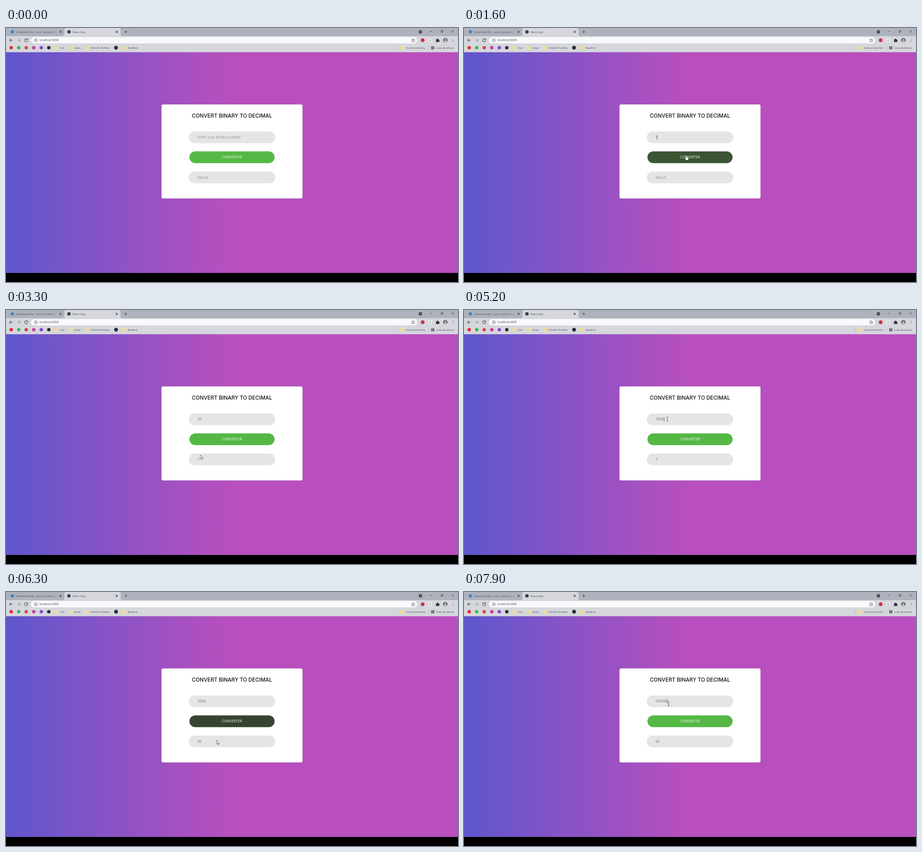
These frames come from a looping animation (998x561 px, 8 s). An HTML page:

```html
<!DOCTYPE html>
<html lang="en">
<head>
<meta charset="utf-8">
<title>Binary converter</title>
<style>
  html, body { margin: 0; width: 100%; height: 100%; overflow: hidden; background: #000; }
  svg { display: block; width: 100%; height: 100%; }
  .ui { font: 6px "Open Sans", sans-serif; fill: #4b4d54; }
  .page { font: 300 8.1px Inter, sans-serif; fill: #858585; }
  .line { fill: none; stroke: #44464d; stroke-width: 1.1; }
</style>
</head>
<body>
<svg viewBox="0 0 998 561">
  <defs>
    <linearGradient id="sky">
      <stop offset="0" stop-color="#5f56cc"/>
      <stop offset=".5" stop-color="#b94fbe"/>
    </linearGradient>
    <linearGradient id="fadeTab" x1="0" x2="1">
      <stop offset="0" stop-color="#afb2bc" stop-opacity="0"/>
      <stop offset="1" stop-color="#afb2bc"/>
    </linearGradient>
  </defs>

  <!-- Browser frame -->
  <rect width="998" height="54" fill="#d5d7dd"/>
  <rect width="998" height="18" fill="#afb2bc"/>
  <path d="M125 18q4 0 4-4V4q0-4 4-4h116q4 0 4 4v10q0 4 4 4z" fill="#d5d7dd"/>
  <rect x="55" y="20" width="853" height="14" rx="7" fill="#f8f9fa"/>
  <g class="ui">
    <text x="22" y="11">Download file – your conversion</text>
    <rect x="98" y="2" width="16" height="14" fill="url(#fadeTab)"/>
    <rect x="114" y="2" width="12" height="14" fill="#afb2bc"/>
    <text x="147" y="11">React App</text>
    <text x="74" y="29.3" font-size="6.3">localhost:3000</text>
  </g>
  <g id="marks"></g>
  <g class="line">
    <path d="M118.500 6.500l4 4m0-4l-4 4M242.500 6.500l4 4m0-4l-4 4M261.500 8.500h6m-3-3v6"/>
    <path d="M15 27H8m3-3l-3 3 3 3"/>
    <path d="M24.500 27h7m-3-3l3 3-3 3" stroke="#92959d"/>
    <path d="M47 25a3.300 3.300 0 1 0 .7 3M48 23.500v2.500h-2.500"/>
    <circle cx="66" cy="27" r="3.200" stroke-width=".8"/>
    <path d="M66 26.500v2.200m0-3.700v.8" stroke-width=".8"/>
    <path d="M899 23.400l1.100 2.500 2.700.2-2 1.800.6 2.700-2.400-1.400-2.400 1.400.6-2.700-2-1.800 2.700-.2z" stroke-width=".8"/>
    <path d="M935 7.500h6M983.500 5l5 5m0-5l-5 5" stroke-width=".8"/>
    <path d="M960 6.500h3.500v3.500H960zm1.300 0V5.200h3.500v3.500h-1.300" stroke-width=".7"/>
    <path d="M864.500 39v9M933.500 39v9" stroke="#b3b6bd" stroke-width=".8"/>
    <path d="M939.500 41h5.500v5.500h-5.500zm0 1.900h5.500m-5.500 1.800h5.500"/>
  </g>
  <circle cx="915" cy="8.500" r="3.700" fill="#3b3d43"/>
  <path d="M913.300 7.700h3.400l-1.700 2z" fill="#d5d7dd"/>
  <rect x="932.500" y="23" width="8" height="8" rx="1" fill="#eceef1"/>
  <path d="M936.500 24.500v4m-1.500-1.500l1.500 1.500 1.500-1.500" class="line" style="stroke-width:.7"/>
  <path d="M949.500 25h2q0-1.800 1.300-1.800t1.300 1.800h2v2q1.500 0 1.500 1.200t-1.500 1.200v1.600h-6.600z" fill="#34363c"/>
  <circle cx="970" cy="27" r="5" fill="#62656d"/>
  <path d="M966.500 30q0-2.500 3.500-2.500t3.500 2.500l-1.500 1.300h-4z" fill="#c0c3ca"/>
  <circle cx="970" cy="25.500" r="1.700" fill="#c0c3ca"/>
  <path d="M987 24v1m0 1.500v1m0 1.500v1" class="line"/>

  <!-- Page -->
  <rect y="53.500" width="998" height="487.500" fill="url(#sky)"/>
  <rect y="541" width="998" height="20"/>
  <rect x="342.500" y="168" width="313" height="209.500" rx="4" fill="#9140a4" opacity=".55"/>
  <rect x="343.300" y="168.800" width="311.400" height="207.700" rx="3.500" fill="#fff"/>
  <rect x="403.500" y="228.500" width="191" height="26" rx="13" fill="#e5e5e5"/>
  <rect id="button" x="405" y="272.500" width="188" height="26" rx="13"/>
  <rect x="403.500" y="317" width="191" height="26" rx="13" fill="#e5e5e5"/>
  <g class="page">
    <text x="499" y="198" text-anchor="middle" style="font-size:11.6px;font-weight:500;fill:#111">CONVERT BINARY TO DECIMAL</text>
    <text x="499" y="288" text-anchor="middle" style="font-size:7.3px;font-weight:400;fill:#edf5eb">CONVERTER</text>
    <text id="input" x="423" y="244"></text>
    <text id="result" x="423" y="332.500"></text>
  </g>
  <rect id="caret" y="236.500" width=".8" height="10" fill="#444"/>
  <g id="cursor" stroke-linejoin="round">
    <path id="arrow" d="M0 0v9l2-1.800 1.500 3.300 1.600-.7-1.500-3.200h2.700z" fill="#fff" stroke="#444" stroke-width=".8"/>
    <path id="beam" d="M-1.700-4.500h3.400M0-4.500v9m-1.700 0h3.400" fill="none" stroke="#444" stroke-width=".9"/>
    <path id="hand" d="M-1 1q1-1.500 2 0v3l3 .7q1 .4.8 1.600L4 11H-.5l-3-3.800q.8-1.300 2.500.3z" fill="#fff" stroke="#444" stroke-width=".6"/>
  </g>
</svg>
<script>
const $ = id => document.getElementById(id);
const LOOP = 8000, STEP = 100, FADE = 700;

const dot = (x, y, color, r = 3.8) => `<circle cx="${x}" cy="${y}" r="${r}" fill="${color}"/>`;
const folder = (x, label) =>
  `<rect x="${x}" y="40" width="7.500" height="7.500" rx="1" fill="#f3dc86"/>` +
  `<text class="ui" style="font-size:5.7px" x="${x + 12}" y="46">${label}</text>`;

$("marks").innerHTML =
  dot(14, 8.5, "#3989ce") + dot(139, 8.5, "#30424f") + dot(920, 27, "#d52f48", 4.2) +
  ["#e22c32", "#36bd50", "#d34b43", "#c63f98", "#8847d4", "#2c2d32"]
    .map((color, i) => dot(11.5 + i * 16.6, 43.5, color)).join("") +
  dot(243, 43.5, "#292c33", 4.2) +
  folder(107.5, "Fun") + folder(138.5, "Aulas") + folder(174.5, "Friend's Profiles") +
  folder(256.5, "Readme") + folder(870.5, "Outros favoritos") +
  '<text class="ui" style="font-size:5.7px" x="950" y="46">Lista de leitura</text>';

// Pointer path: time, x, y
const path = [
  [500, 930, 6], [900, 455, 241], [1200, 452, 241], [1300, 490, 280],
  [1600, 491, 281], [2000, 487, 284], [2100, 482, 285], [2200, 482, 285],
  [2300, 480, 304], [2500, 466, 378], [2600, 466, 382], [3100, 441, 332],
  [3200, 440, 331], [3300, 429, 320], [3500, 396, 300], [3600, 396, 270],
  [3900, 449, 241], [5500, 449, 241], [5700, 480, 280], [6100, 480, 283],
  [6200, 474, 304], [6300, 465, 327], [6400, 465, 336], [6800, 460, 328],
  [7000, 470, 223], [7300, 453, 241], [7500, 452, 247], [LOOP, 452, 247]
];
const entries = [[0, ""], [1600, "1"], [1700, "11"], [1900, "111"], [4800, "1110"],
  [5000, "11101"], [5200, "111010"], [7800, "1110101"], [7900, "11101010"]];
const results = [[0, ""], [2300, "7"], [6100, "58"]];
const focus = [[0, false], [1000, true], [2200, false], [4400, true], [5700, false], [7800, true]];
const hovers = [[1270, 2280], [5640, 6260]];

const latest = (list, t) => list.filter(([start]) => start <= t).pop()[1];
const ease = p => 1 - (1 - Math.min(1, Math.max(0, p))) ** 2.2;

function pointer(t) {
  const i = path.findIndex(([end]) => end > t);
  const [t0, x0, y0] = path[i - 1], [t1, x1, y1] = path[i];
  const p = (t - t0) / (t1 - t0);
  return [x0 + (x1 - x0) * p, y0 + (y1 - y0) * p];
}

function setField(id, value, placeholder) {
  const field = $(id);
  field.textContent = value || placeholder;
  field.style.cssText = value ? "font-size:7.5px;font-weight:400;letter-spacing:-.6px" : "";
}

function draw(t) {
  const entry = latest(entries, t);
  setField("input", entry, "Enter your binary number");
  setField("result", latest(results, t), "Result");

  $("caret").style.display = latest(focus, t) ? "" : "none";
  $("caret").setAttribute("x", 423.5 + (entry ? $("input").getComputedTextLength() : 0));

  const dark = hovers.reduce((sum, [on, off]) =>
    sum + ease((t - on) / FADE) - ease((t - off) / FADE), 0);
  const mix = (a, b) => Math.round(a + (b - a) * dark);
  $("button").setAttribute("fill", `rgb(${mix(85, 51)},${mix(184, 51)},${mix(69, 46)})`);

  $("cursor").style.display = t < path[0][0] ? "none" : "";
  if (t < path[0][0]) return;
  const [x, y] = pointer(t);
  const over = (top, bottom) => x > 404 && x < 594 && y > top && y < bottom;
  const kind = over(228, 255) ? "beam" : over(272, 299) ? "hand" : "arrow";
  for (const id of ["arrow", "beam", "hand"]) $(id).style.display = id === kind ? "" : "none";
  $("cursor").setAttribute("transform", `translate(${x} ${y})`);
}

const start = performance.now();
function tick() {
  const t = (performance.now() - start) % LOOP;
  draw(Math.floor(t / STEP) * STEP);
  requestAnimationFrame(tick);
}
tick();
</script>
</body>
</html>
```
